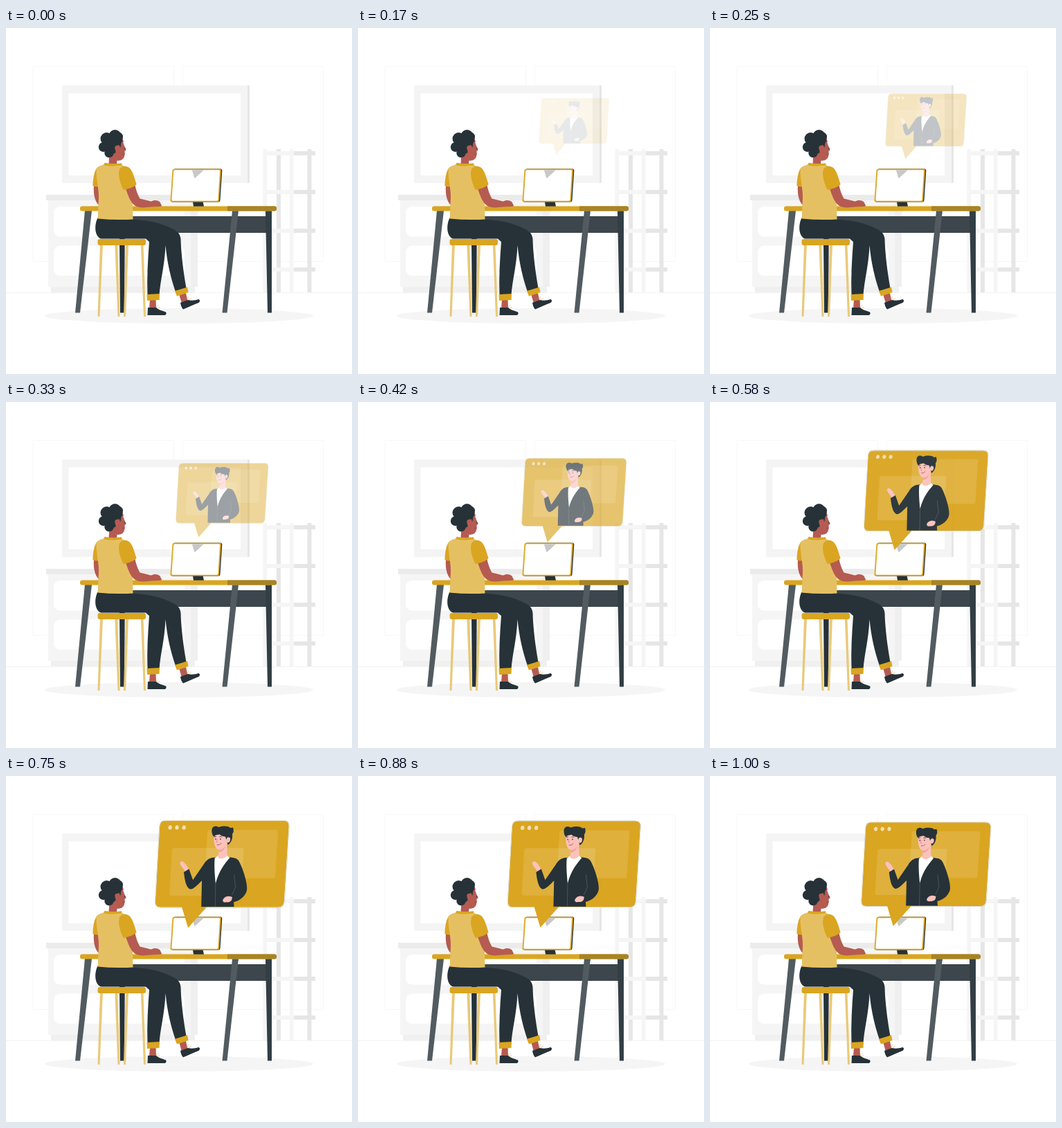
An HTML page with a canvas for the animation above (1.04 s loop, 500 by 500 pixels).

```html
<!DOCTYPE html>
<html lang="en">
<head>
<meta charset="utf-8">
<title>Video call</title>
<style>
html, body { margin: 0; width: 100%; height: 100%; overflow: hidden; background: #fff; }
canvas { display: block; width: 500px; height: 500px; }
</style>
</head>
<body>
<canvas id="stage" width="500" height="500"></canvas>
<script>
const SIZE = 500, LOOP = 1040, FPS = 24;
const GOLD = '#daa520', PALE_GOLD = '#e5c063', WOOD = '#e9c979';
const DARK = '#263238', STEEL = '#515b60', APRON = '#3c464c';
const SKIN = '#b55b52', PINK = '#fbc1bc';
const LIGHT = '#f5f5f5', GREY = '#e6e6e6';

const stage = document.getElementById('stage').getContext('2d');
const scene = layer(), bubble = layer();

function layer() {
  const c = document.createElement('canvas');
  c.width = c.height = SIZE;
  return c.getContext('2d');
}

function fill(g, color, d) {
  g.fillStyle = color;
  g.fill(new Path2D(d));
}

function line(g, color, width, d) {
  g.strokeStyle = color;
  g.lineWidth = width;
  g.lineCap = 'round';
  g.stroke(new Path2D(d));
}

function box(g, color, x1, y1, x2, y2, r = 0) {
  g.fillStyle = color;
  g.beginPath();
  g.roundRect(x1, y1, x2 - x1, y2 - y1, r);
  g.fill();
}

function oval(g, color, x, y, rx, ry = rx, turn = 0) {
  g.fillStyle = color;
  g.beginPath();
  g.ellipse(x, y, rx, ry, turn, 0, Math.PI * 2);
  g.fill();
}

// Tapered leg: top edge a..b at y1, bottom edge c..d at y2
function leg(g, color, a, b, y1, c, d, y2) {
  fill(g, color, `M${a} ${y1}H${b}L${d} ${y2}H${c}Z`);
}

function drawRoom(g) {
  for (const x of [39.5, 255.5]) line(g, '#f7f7f7', 1, `M${x} 55.5h203v282h-203z`);
  line(g, '#f3f3f3', 1, 'M0 382.5H500');

  box(g, GREY, 340, 83, 352, 224, 1);
  box(g, '#f4f4f4', 81, 83, 349, 224, 1);
  box(g, '#fff', 90.5, 94.5, 339, 213);

  box(g, '#f0f0f0', 65, 374, 273, 382);
  box(g, LIGHT, 61, 249, 277, 374);
  box(g, '#efefef', 267, 249, 277, 374);
  for (const y of [258, 314.5]) box(g, '#fff', 69, y, 258, y + 43.5, 9);
  box(g, '#ebebeb', 58, 241, 278, 249);

  for (const x of [391, 435.5]) box(g, GREY, x, 175, x + 6, 382);
  for (let i = 0; i < 4; i++) {
    const y = 178 + i * 56;
    box(g, LIGHT, 372, y, 416, y + 6);
    box(g, GREY, 416, y, 447, y + 6);
  }
  for (const x of [371.5, 410]) box(g, LIGHT, x, 175, x + 5.5, 382);
  oval(g, LIGHT, 250, 416, 194, 11);
}

function drawDesk(g) {
  leg(g, DARK, 163.5, 172, 264, 165, 171, 411.5);
  box(g, APRON, 178, 272, 378, 296);
  leg(g, '#323e44', 375, 384, 264, 378, 384, 411.5);
  leg(g, STEEL, 114, 124, 264, 100, 107, 411.5);
  leg(g, STEEL, 327, 336, 264, 312.5, 319.5, 411.5);
  box(g, GOLD, 107, 257.5, 391, 264.5, 3);
  box(g, '#a58429', 320, 257.5, 391, 264.5, [0, 3, 3, 0]);
}

function drawMonitor(g) {
  const screen = 'M243.5 203.5H308.5Q311.2 203.5 311 206L308.2 249Q308 251.5 305.4 251.5H240Q237.3 251.5 237.5 249L240.5 206Q240.7 203.5 243.5 203.5Z';
  fill(g, DARK, 'M270 251H284.5L286 257.8H271Z');
  g.save();
  g.translate(1.3, 0);
  fill(g, DARK, screen);
  g.restore();
  fill(g, GOLD, screen);
  fill(g, '#fff', 'M244 205.3H307.5Q309.2 205.3 309 207L306.4 248Q306.3 249.8 304.5 249.8H241Q239.3 249.8 239.4 248L242.2 207Q242.3 205.3 244 205.3Z');
  fill(g, '#c8c8c8', 'M268.8 205.3H285.8L272.5 217.5Z');
}

function drawWorker(g) {
  // Stool
  leg(g, WOOD, 136, 140, 312, 132.5, 135.5, 417);
  leg(g, WOOD, 157.3, 161.3, 312, 161.5, 164.5, 417);
  leg(g, WOOD, 173, 177, 312, 170, 173, 417);
  leg(g, WOOD, 194.8, 198.5, 312, 199, 202, 417);

  // Feet
  fill(g, SKIN, 'M208 392H216.5L217 405H207Z M250.5 386L260 383L262.5 395L254 398Z');
  fill(g, DARK, 'M205 404H217C221 408 228 409 231 410.5C232.3 412.5 231.5 415 229 415H204.5Z');
  fill(g, DARK, 'M252 397L263 393C268 394.5 274 393.5 278 392C280.5 392.5 280.8 395 278.5 397C271 400 263 403.5 256 406.5C253.5 404 252.5 400 252 397Z');
  line(g, WOOD, 0.9, 'M217 403.5l3-2.5M219 405l3-1.2M262.5 392l1.5-3.2M265 392.5l2.3-2.5');

  // Trousers
  fill(g, DARK, 'M132.5 274.5C128 283 127 300 137 304.5H202L207 309C205 335 203.5 360 204.5 386H221.5C223 365 229.5 342 230.5 314C233 340 238 361 245 381L260.5 376C256 350 253 325 252.5 305C252 297 247 293 240 290C225 282 205 278 183 276.5Z');
  fill(g, GOLD, 'M203.5 385L222 384L221.5 393L204 394Z M244 380L262 374.5L263.5 382L247 387.5Z');
  box(g, GOLD, 132.5, 305, 202, 314, 3);

  // Body and arms
  fill(g, SKIN, 'M127 227L134.5 229L136 257.5C130 254 125.5 243 127 227Z');
  fill(g, GOLD, 'M133 200.5C127 206 126 217 125.3 228Q129.5 230 134.5 229.5L138 206Z');
  fill(g, PALE_GOLD, 'M143 197C136 198.5 131 200.5 130.5 206C130.5 220 134.5 233 134 246L132.5 275.5Q158 278 183.5 276.5L183 254L181 235L178 203L167 197.5Z');
  fill(g, SKIN, 'M173 232L186.5 227C188 234 190 241 193.5 246.5L209.5 250.5C214 248 220 248.5 222.5 251.5L225.3 257.3Q223 258.3 219 258L210 258.5C203 259.3 196 260 190.5 258.5C181 256 177 244 173 232Z');
  fill(g, GOLD, 'M164 204C167 199 175 198 180 204C184.5 210 186 219 188.7 226C183 231 176 233 169.5 234C165.5 225 161 213 164 204Z');

  // Head
  fill(g, SKIN, 'M160 164L168.5 161C169.5 167 171 171 173.6 175.3C174 177 172 177.5 171.5 178C172 182 171.5 187 168.5 189.5C166 191.5 163 192 160.5 191.5L160 197Q154 199 148.5 196L149.5 182Z');
  fill(g, GOLD, 'M142.5 194.8Q154 197 167 195.3L167.5 198.3Q154 200.5 141 198.2Z');
  const curls = [[140.8, 172, 7], [145.5, 160, 9], [157.5, 156, 9], [162.5, 157, 6.5], [149, 180.5, 6.7], [151, 169, 10]];
  for (const [x, y, r] of curls) oval(g, DARK, x, y, r);
  fill(g, DARK, 'M150 158L168 157C169.5 161 168.5 164 166.5 166L165.3 173L163.5 169L158 171L158.5 180L152 184Z');
  oval(g, SKIN, 160.8, 174, 3.4, 4.3, -0.2);
  line(g, DARK, 0.9, 'M168.6 164.3l1.2-1.2M170.8 173.5l1.2 1.5');
  line(g, '#8f4039', 0.7, 'M168.6 182.8l2.8-.9');
}

function drawBubble(g) {
  const panel = 'M233 67.3H398Q406 67.3 405.4 75L398.8 180Q398 188 390.5 188H226Q218.6 188 219.2 180L225.2 75Q226 67.3 233 67.3Z';
  line(g, '#b5b5ad', 1.6, panel);
  line(g, '#fff', 0.9, panel);
  fill(g, GOLD, 'M255.8 187H291.5L264.7 217Z');
  fill(g, GOLD, panel);

  const glass = 'rgba(255,255,255,.12)';
  fill(g, glass, 'M245.5 105.3H339.5Q343 105.3 342.7 109L339 168.5Q338.7 172 335 172H242Q238.4 172 238.6 168.5L242 109Q242.3 105.3 245.5 105.3Z');
  fill(g, glass, 'M295 80H387Q390.6 80 390.4 83.5L386.6 144Q386.4 147.6 383 147.6H291.5Q288 147.6 288.2 144L291.6 83.5Q291.8 80 295 80Z');
  for (const x of [239.6, 249.2, 259]) oval(g, '#f2dfaf', x, 76.6, 2.6, 3, 0.2);
  drawCaller(g);
}

function drawCaller(g) {
  // Hands
  fill(g, PINK, 'M267 137C264 131 261 126 256.5 123.8C254 123.5 252.6 126 254 128.5C256 133 259 135 261.5 139Z');

  // Jacket and shirt
  fill(g, DARK, 'M301 118.5C294 119 290 122 286 129L271.5 150L266 134.5L258.8 139C260 150 262 160 267 162.6C271 164.5 278 157 284 151L283.2 187.5H329L328.5 181C337 179 346 172 347 163C348 154 340 130 335 122.5C331 118 326 119 322 118Z');
  fill(g, '#fff', 'M302 119.5L306 116.5L319 115.5L323 119C317 126 308 136 303.2 155C302 143 301 130 302 119.5Z');
  line(g, '#5f6a6f', 0.6, 'M303.2 155L302.6 187M329 143L331 160L326 171');
  fill(g, PINK, 'M326.5 174C321 171.5 316.5 173 314 176.5C312 179.5 314.5 182 318 181C322 181.3 325 180 325.8 177.5Z');

  // Head
  fill(g, PINK, 'M301.5 86C299.5 95 301 106.5 308 108L306.5 117.5C309 122 316 120.5 319.5 116L319 100L325 92L318 82Z');
  fill(g, '#f2a29c', 'M308 108Q314 107.5 317 102Q315 110 307.6 111.5Z');
  fill(g, DARK, 'M299.5 88C296.5 82 297.5 75 303 74.8C305 74.6 306 75.5 307.5 76.3C314 74 321 74.5 324 77.2C326.5 77.5 328 76 327.7 77.5C329 82 328 84 326.5 86C327.5 93 324 99 320.5 101L318.3 95L317 89.5C313 89.5 310 87.5 308.5 86.2C305.5 87.5 302.5 86 301.5 90Z');
  oval(g, PINK, 320.8, 94, 2.8, 3.8, 0.25);
  oval(g, DARK, 303.3, 93, 0.7, 1);
  oval(g, DARK, 310, 92.8, 0.7, 1);
  line(g, DARK, 0.8, 'M302 90l1.8-.7M308.8 89.5q1.5-.8 3 .2');
  line(g, '#d9837d', 0.7, 'M305.5 93l-1.2 4l1.6.2');
  line(g, '#a34c48', 0.8, 'M305.3 101Q308.8 102 311 98.8');
}

// Progress as [ms, value, slope per second]; overshoots past 1 and settles back
const KEYS = [
  [120, 0, 2.1], [250, 0.28, 2.2], [420, 0.65, 2.1], [500, 0.815, 1.95],
  [580, 0.956, 1.5], [750, 1.11, 0.25], [1000, 1.04, -0.4]
];

function progress(t) {
  if (t <= KEYS[0][0]) return 0;
  for (let i = 1; i < KEYS.length; i++) {
    const [t0, v0, m0] = KEYS[i - 1], [t1, v1, m1] = KEYS[i];
    if (t > t1) continue;
    const h = (t1 - t0) / 1000, u = (t - t0) / (t1 - t0), w = 1 - u;
    return w * w * (1 + 2 * u) * v0 + u * u * (3 - 2 * u) * v1 + h * u * w * (w * m0 - u * m1);
  }
  return KEYS[KEYS.length - 1][1];
}

function render(ms) {
  // Whole steps at 24 per second, with step times rounded to 10 ms
  const step = Math.floor((Math.floor((ms % LOOP) / 10) + 0.49) * FPS / 100);
  const p = progress(Math.round(step * 100 / FPS) * 10);

  stage.drawImage(scene.canvas, 0, 0);
  if (p <= 0) return;

  const s = (0.5 + 0.5 * p) / 1.02, cx = 312, cy = 142;
  bubble.setTransform(1, 0, 0, 1, 0, 0);
  bubble.clearRect(0, 0, SIZE, SIZE);
  bubble.setTransform(s, 0, 0, s, cx - cx * s, cy - cy * s);
  drawBubble(bubble);
  stage.globalAlpha = Math.min(1, p);
  stage.drawImage(bubble.canvas, 0, 0);
  stage.globalAlpha = 1;
}

box(scene, '#fff', 0, 0, SIZE, SIZE);
drawRoom(scene);
drawDesk(scene);
drawMonitor(scene);
drawWorker(scene);

const start = performance.now();
function tick() {
  render(performance.now() - start);
  requestAnimationFrame(tick);
}
tick();
</script>
</body>
</html>
```
